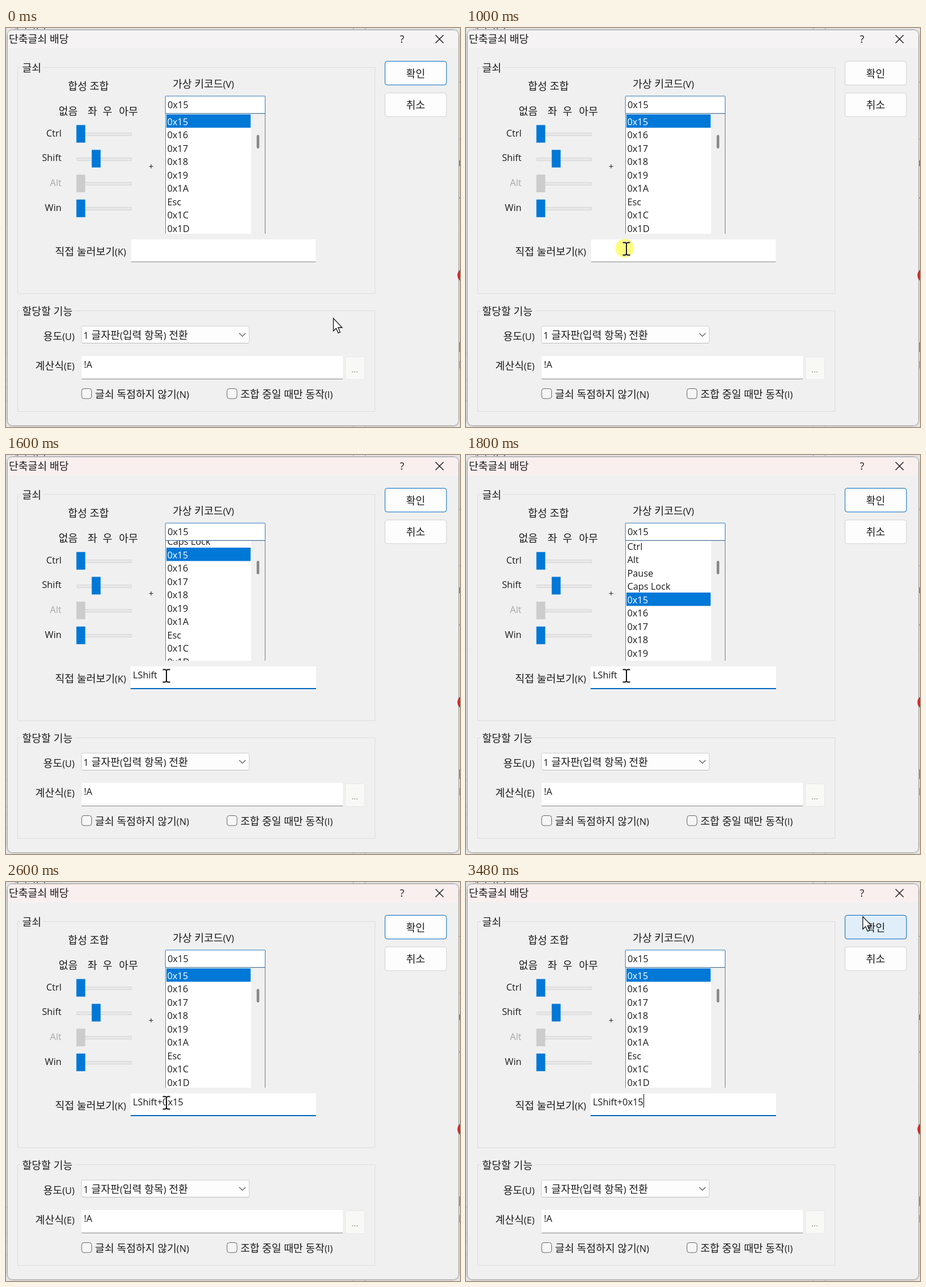
Recreate the animation shown at these times as an HTML page with a canvas. Size 798 px wide and 702 px high, loop 3.92 s.

```html
<!DOCTYPE html>
<html lang="ko">
<head>
<meta charset="utf-8">
<title>단축글쇠 배당</title>
<style>
html, body { margin: 0; width: 100%; height: 100%; overflow: hidden; background: #e4e4e6; }
canvas { display: block; }
</style>
</head>
<body>
<canvas id="stage" width="798" height="702" lang="ko"></canvas>
<script>
const ctx = document.getElementById('stage').getContext('2d');
const LOOP = 3920, ROW = 23.5;
const FONT = '"Open Sans", "Noto Sans CJK KR", "Noto Sans CJK", sans-serif';
const BLUE = '#0078d7', ACCENT = '#0067c0', INK = '#1a1a1a', LINE = '#d0d0d0';
const KO = 18.2, EN = 16.3;

const KEYS = ['Shift', 'Ctrl', 'Alt', 'Pause', 'Caps Lock', '0x15', '0x16', '0x17',
  '0x18', '0x19', '0x1A', 'Esc', '0x1C', '0x1D', '0x1E'];
const HOME = KEYS.indexOf('0x15');

// Stepped tracks: [start ms, ...values]
const POINTER = [
  [0, 'arrow', 575, 510], [120, 'arrow', 560, 487], [200, 'arrow', 522, 440],
  [320, 'beam', 458, 392], [400, 'beam', 425, 384], [480, 'beam', 378, 386],
  [600, 'beam', 332, 389], [680, 'beam', 282, 388.5],
  [2800, 'beam', 306, 389], [2880, 'beam', 410, 390], [2960, 'arrow', 556, 386],
  [3040, 'arrow', 636, 262], [3160, 'arrow', 684, 122], [3280, 'arrow', 700, 72],
  [3400, 'arrow', 698, 63], [3480, 'arrow', 697, 60]
];
const SCROLL = [[0, 0], [1600, 11], [1720, 56], [1800, 90], [1920, HOME * ROW], [2080, 0]];
const TYPED = [[0, ''], [1600, 'LShift'], [2080, 'LShift+0x15']];
const CARET = [[0, false], [1080, true], [1600, false], [1920, true], [2600, false], [3400, true]];
const TITLE = [[0, '#f5f3f3'], [120, '#f3f3f3'], [1000, '#f5f3f3'], [1080, '#faefef']];
const HOVER = [[0, '#fdfdfd'], [3160, '#f4f8fc'], [3280, '#e8f1f9'], [3400, '#e0eef9']];

function at(track, t) {
  let hit = track[0];
  for (const key of track) if (key[0] <= t) hit = key;
  return hit.slice(1);
}
const within = (t, a, b) => t >= a && t < b;

function rect(x, y, w, h, color) {
  ctx.fillStyle = color;
  ctx.fillRect(x, y, w, h);
}

function box(x, y, w, h, r, fill, stroke) {
  ctx.beginPath();
  ctx.roundRect(x + 0.5, y + 0.5, w - 1, h - 1, r);
  if (fill) { ctx.fillStyle = fill; ctx.fill(); }
  if (stroke) { ctx.strokeStyle = stroke; ctx.lineWidth = 1; ctx.stroke(); }
}

function path(points, color, width = 1) {
  ctx.beginPath();
  points.forEach(([x, y]) => ctx.lineTo(x, y));
  ctx.strokeStyle = color;
  ctx.lineWidth = width;
  ctx.stroke();
}

function setFont(size) {
  ctx.font = `${size}px ${FONT}`;
}

function text(s, x, y, size = EN, color = INK, align = 'left') {
  setFont(size);
  ctx.textAlign = align;
  ctx.fillStyle = color;
  ctx.fillText(s, x, y);
}

// Hangul runs are set larger than the Latin ones beside them.
function label(s, x, y, align = 'left', color = INK) {
  const runs = s.match(/[가-힣 ]+|[^가-힣 ]+/g).map(run => {
    const size = /[가-힣 ]/.test(run) ? KO : EN;
    setFont(size);
    return { run, size, width: ctx.measureText(run).width };
  });
  const total = runs.reduce((sum, r) => sum + r.width, 0);
  x -= total * { left: 0, center: 0.5, right: 1 }[align];
  for (const { run, size, width } of runs) {
    text(run, x, y, size, color);
    x += width;
  }
}

function backdrop() {
  rect(0, 0, 798, 702, '#e4e4e6');
  text('에디터(T)', 8, 0, 16, '#444');
  for (const x of [610, 631]) {
    rect(x, 0, 1, 3, '#999');
    rect(x, 700, 1, 2, '#999');
  }
  for (const y of [572, 618, 632, 655]) rect(0, y, 3, 1, '#aaa');
  rect(795, 95, 3, 1, '#666');
  rect(795, 195, 3, 1, '#999');
  rect(796, 233, 2, 10, '#555');
  rect(796, 298, 2, 2, '#777');
  rect(796, 553, 2, 17, '#5b6aa8');
  rect(796, 586, 2, 13, '#999');
}

function frame(t) {
  const active = !within(t, 120, 1000);
  const ink = active ? INK : '#919191';
  box(1, 2, 796, 699, 10, '#f0f0f0', '#bdbdbd');
  box(2, 3, 794, 697, 9, null, '#b0b0b0');
  ctx.save();
  ctx.beginPath();
  ctx.roundRect(3, 4, 792, 695, 8);
  ctx.clip();
  rect(3, 4, 792, 32, at(TITLE, t)[0]);
  ctx.restore();
  ctx.beginPath();
  ctx.arc(806, 435, 12.5, 0, Math.PI * 2);
  ctx.fillStyle = '#d5262c';
  ctx.fill();
  label('단축글쇠 배당', 5, 26, 'left', ink);
  text('?', 696, 25.5, 18, ink, 'center');
  path([[755, 12.5], [769, 26.5]], ink, 1.4);
  path([[769, 12.5], [755, 26.5]], ink, 1.4);
}

function group(name, y, h, gap) {
  box(20, y, 629, h, 0, null, '#dcdcdc');
  rect(25, y - 1, gap, 3, '#f0f0f0');
  label(name, 28.5, y + 7.5);
}

function slider(name, i, pos, enabled = true) {
  const y = 171 + i * 43.7;
  text(name, 97.5, y + 19.5, EN, enabled ? INK : '#a8a8a8', 'right');
  box(124, Math.round(y + 13), 97, 6, 0, '#e7e7e7', '#d6d6d6');
  rect(123.7 + pos, y - 0.3, 15.6, 31, enabled ? BLUE : '#cccccc');
}

function keyList(t) {
  const offset = at(SCROLL, t)[0];
  const moved = within(t, 1600, 2080);
  const picked = within(t, 1920, 2080) ? 0 : HOME;

  rect(281, 151, 150, 211, '#fff');
  rect(280, 151, 1, 211, '#7a7a7a');
  rect(455, 151, 1, 211, '#7a7a7a');
  ctx.save();
  ctx.beginPath();
  ctx.rect(281, 151, 150, 211);
  ctx.clip();
  KEYS.forEach((key, i) => {
    const y = 152 + offset + (i - HOME) * ROW;
    if (i === picked) rect(282, y, 148, ROW, BLUE);
    text(key, 283.5, y + 18.8, EN, i === picked ? '#fff' : INK);
  });
  ctx.restore();
  box(440.6, moved ? 186 : 188, 4.6, 24, 2, '#868686', '#868686');

  box(279.7, 119.3, 176.3, 31.5, 1, '#fff', '#2f78bb');
  rect(280, 150, 176, 1, '#4c6f90');
  text(KEYS[picked], 284, 140.8);
}

function keyEdit(t) {
  const typed = at(TYPED, t)[0];
  if (t >= 1080) {
    rect(219, 372, 326, 38, '#fff');
    rect(219, 410, 326, 2, ACCENT);
  } else {
    rect(220, 372, 324.5, 39, '#fff');
    rect(220, 411, 324.5, 1, '#868686');
  }
  if (within(t, 1000, 1200)) {
    ctx.beginPath();
    ctx.arc(279, 387.5, 16.5, 0, Math.PI * 2);
    ctx.fillStyle = '#fdfd80';
    ctx.fill();
  }
  text(typed, 223, 392.5);
  if (at(CARET, t)[0]) {
    const x = { '': 223, LShift: 265 }[typed] || 312;
    rect(x, 373, 1, 24, '#000');
  }
}

function checkbox(name, x) {
  box(x, 634, 18.5, 18.5, 4, '#f6f6f6', '#666');
  label(name, x + 24, 651);
}

function button(name, y, fill, stroke) {
  box(665.7, y, 109, 42.7, 4, fill, stroke);
  label(name, 720, y + 28.7, 'center');
}

function dialog(t) {
  group('글쇠', 69, 399, 40);
  label('합성 조합', 109, 108.5);
  label('가상 키코드(V)', 293, 105);
  label('없음', 92.5, 152.5);
  label('좌', 143.5, 152.5);
  label('우', 170, 152.5);
  label('아무', 198.5, 152.5);
  slider('Ctrl', 0, 0);
  slider('Shift', 1, 27);
  slider('Alt', 2, 0, false);
  slider('Win', 3, 0);
  text('+', 255, 249, 15, INK, 'center');
  keyList(t);
  label('직접 눌러보기(K)', 211, 399.5, 'right');
  keyEdit(t);

  group('할당할 기능', 497, 178, 96);
  label('용도(U)', 120.5, 548.5, 'right');
  box(132, 524, 296, 31, 3, '#fdfdfd', LINE);
  rect(134, 554, 292, 1, '#bcbcbc');
  label('1 글자판(입력 항목) 전환', 136, 546.5);
  path([[410, 537], [415.5, 542.5], [421, 537]], '#555', 1.2);
  label('계산식(E)', 120.5, 601, 'right');
  rect(133, 577, 459, 40, '#fff');
  rect(133, 617, 459, 1, '#868686');
  text('!A', 137, 598.3);
  box(596, 578, 35, 41, 3, '#f8f8f7', '#e8e8e8');
  text('...', 613, 605.5, 15, '#8f867a', 'center');
  checkbox('글쇠 독점하지 않기(N)', 132.5);
  checkbox('조합 중일 때만 동작(I)', 388);

  const focus = !within(t, 120, 1080);
  button('확인', 58, at(HOVER, t)[0], focus ? ACCENT : LINE);
  button('취소', 113.7, '#fdfdfd', LINE);
}

function pointer(t) {
  const [kind, x, y] = at(POINTER, t);
  ctx.save();
  ctx.translate(x, y);
  if (kind === 'arrow') {
    ctx.beginPath();
    [[0.5, 0.8], [0.5, 23], [5.3, 18.3], [9, 26.6], [12.3, 25.2], [8.8, 17], [15.8, 17]]
      .forEach(([px, py]) => ctx.lineTo(px, py));
    ctx.closePath();
    ctx.fillStyle = '#fff';
    ctx.fill();
    ctx.strokeStyle = '#111';
    ctx.lineWidth = 1.3;
    ctx.stroke();
  } else {
    for (const [color, width] of [['#fff', 3.4], ['#111', 2]]) {
      path([[0, -10], [0, 10]], color, width);
      for (const s of [-1, 1]) {
        path([[-6.5, s * 11], [-2, s * 11], [0, s * 9.5], [2, s * 11], [6.5, s * 11]], color, width);
      }
    }
  }
  ctx.restore();
}

function draw(now) {
  const t = now % LOOP;
  backdrop();
  frame(t);
  dialog(t);
  pointer(t);
}

const start = performance.now();
function tick() {
  draw(performance.now() - start);
  requestAnimationFrame(tick);
}
tick();
</script>
</body>
</html>
```
